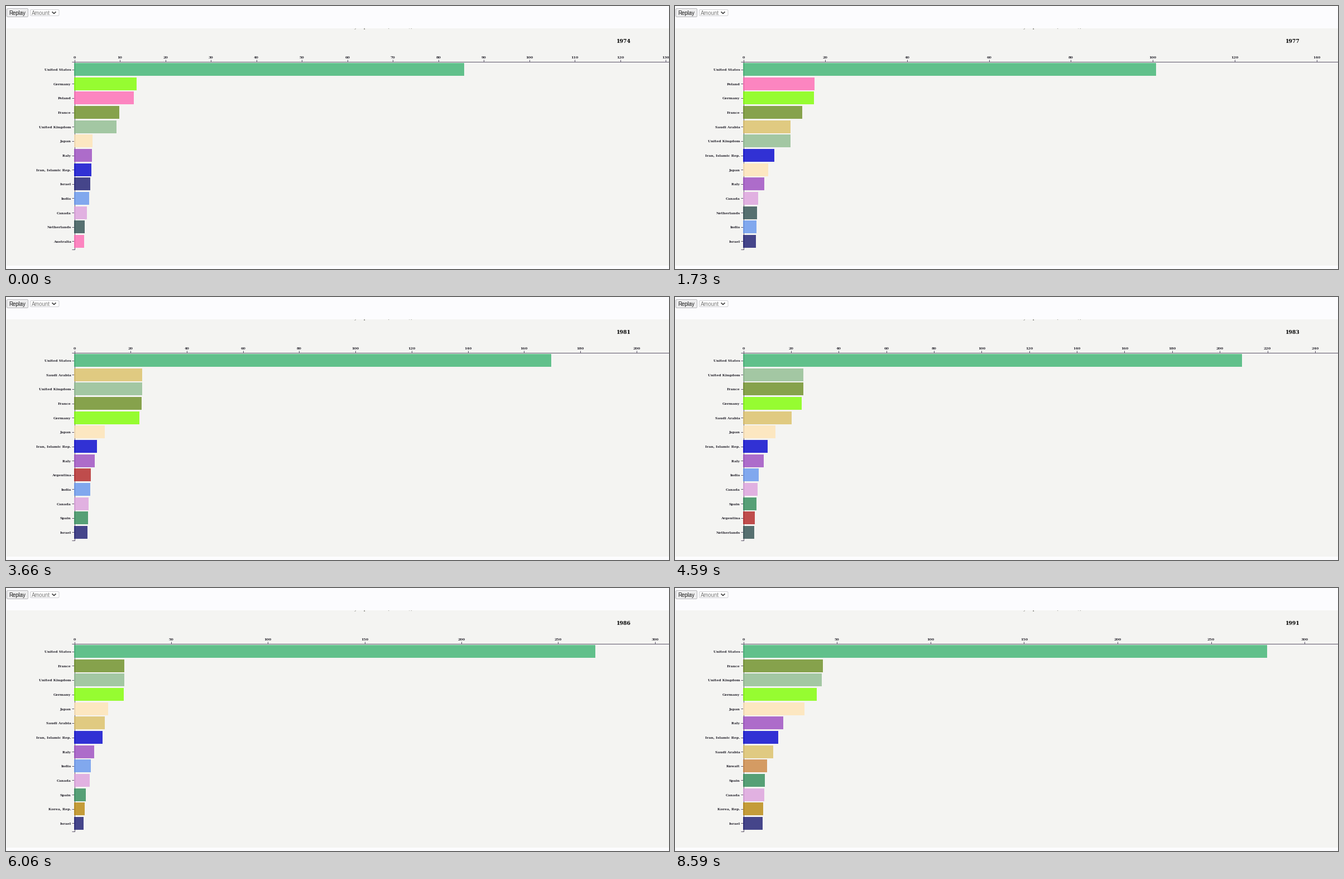
Recreate the animation shown at these times as a matplotlib script. Size 1188 by 471 pixels, loop 8880 ms.

```python
import math

import matplotlib.pyplot as plt
import numpy as np
from matplotlib.animation import FuncAnimation
from matplotlib.patches import FancyBboxPatch, Rectangle

W, H, DPI = 1188, 471, 64
LOOP, STEP = 8880, 30
FIRST_YEAR, FIRST_TICK, YEAR_MS = 1974, 418, 502

# Chart geometry in pixels
X0, SPAN, HEADROOM = 122, 1107, 50
TOP, BOTTOM, ROWS = 99.5, 435.5, 13
PITCH = (BOTTOM - TOP) / (ROWS + 0.1)

# Colour, whether the strong-dollar cycle applies, and a few turning points
SERIES = {
    "United States": ("#3cb371", False, {74: 85.8, 76: 89.4, 77: 100.9, 79: 122.2, 81: 169.8,
                                         85: 258.1, 88: 293, 90: 306, 91: 280.2}),
    "Germany": ("#7fff00", True, {74: 13.7, 81: 23.1, 88: 35.7, 91: 39.5}),
    "Poland": ("#ff69b4", False, {74: 13.1, 77: 17.4, 79: 0.1}),
    "France": ("#6b8e23", True, {74: 9.9, 81: 23.8, 91: 42.6}),
    "United Kingdom": ("#8fbc8f", True, {74: 9.3, 77: 11.5, 81: 24.1, 91: 42}),
    "Japan": ("#ffe4b5", True, {74: 4, 81: 10.9, 88: 28.2, 91: 32.8}),
    "Italy": ("#9c4ac0", True, {74: 3.9, 81: 7.35, 91: 21.5}),
    "Iran, Islamic Rep.": ("#0000cd", False, {74: 3.85, 77: 7.6, 79: 4.95, 81: 8.05, 88: 18.8}),
    "Israel": ("#191970", False, {74: 3.5, 77: 3.2, 81: 4.7, 85: 4.1, 91: 10.5}),
    "India": ("#6495ed", False, {77: 3.3, 81: 5.8, 85: 7.5, 88: 11.2, 91: 8.6}),
    "Canada": ("#dda0dd", False, {74: 2.8, 81: 5.1, 85: 7.4, 91: 11.35}),
    "Netherlands": ("#2f4f4f", True, {74: 2.3, 79: 4.3, 81: 4.6, 91: 7.4}),
    "Australia": ("#ff69b4", False, {74: 2.15, 81: 3.5, 91: 6}),
    "Saudi Arabia": ("#dcc065", False, {74: 2, 77: 11.6, 81: 24.3, 88: 13.3, 91: 16.25}),
    "Argentina": ("#b22222", True, {74: 1.5, 79: 4.35, 81: 5.86, 91: 3}),
    "Spain": ("#2e8b57", True, {74: 1.9, 79: 4.2, 81: 4.95, 91: 11.6}),
    "Korea, Rep.": ("#b8860b", False, {74: 0.6, 85: 4.8, 91: 10.8}),
    "Kuwait": ("#cd853f", False, {74: 0.2, 88: 1.5, 91: 12.8}),
}

INK = "#2c2a33"
AXIS = "#5b5368"
PAPER = "#f4f4f2"

fig = plt.figure(figsize=(W / DPI, H / DPI), dpi=DPI, facecolor="#fcfcfe")
ax = fig.add_axes([0, 0, 1, 1])
ax.set(xlim=(0, W), ylim=(H, 0))
ax.axis("off")


def rect(x, y, w, h, color, **kw):
    return ax.add_patch(Rectangle((x, y), w, h, fc=color, lw=0, **kw))


def line(x, y, color=AXIS, width=1):
    return ax.plot(x, y, color=color, lw=width * 72 / DPI,
                   solid_capstyle="butt")[0]


def text(x, y, s, px, color=INK, font="DejaVu Serif", weight="bold", **kw):
    return ax.text(x, y, s, fontsize=px * 72 / DPI, color=color, family=font,
                   weight=weight, va="baseline", **kw)


def box(x, y, w, h, fill, edge):
    ax.add_patch(FancyBboxPatch((x, y), w, h, fc=fill, ec=edge, lw=72 / DPI,
                                boxstyle="round,pad=0,rounding_size=2"))


def nice_step(span, count=10):
    """Tick step of 1, 2 or 5 times a power of ten."""
    raw = span / count
    base = 10 ** math.floor(math.log10(raw))
    for factor in (10, 5, 2):
        if raw / base >= math.sqrt(factor * {10: 5, 5: 2, 2: 1}[factor]):
            return base * factor
    return base


def value(name, year):
    """Steady growth between turning points, times the dollar cycle."""
    _, cyclic, points = SERIES[name]
    y = year - 1900
    v = math.exp(np.interp(y, list(points), np.log(list(points.values()))))
    if cyclic:
        v *= (1 + 0.17 * math.exp(-((y - 79) / 1.1) ** 2)
              - 0.27 * math.exp(-((y - 85) / 1.6) ** 2))
    return v


# Page controls and chart background
rect(1, 40, W - 1, 425, PAPER)
box(1.5, 4.5, 38, 15, "#ededee", "#b9b9bc")
text(20.5, 16, "Replay", 9.6, "#1c1c1c", "Liberation Sans", "normal", ha="center")
box(43.5, 6.5, 51.5, 11, "#ffffff", "#cfcfd2")
text(46, 16, "Amount", 9.6, "#7b7b7b", "Liberation Sans", "normal")
line([82.5, 86, 89.5], [10.3, 13.6, 10.3], "#4a4a4a", 1.8)

# Heading, cut off by the top edge of the chart
title = text(662.5, 40.4, "Military Expenditure (Billions $)", 7.2, "#77776f",
             ha="center", clip_on=True)
title.set_clip_path(Rectangle((580, 40), 170, 2, transform=ax.transData))

# Axes and one bar and label per row, under the bars
names = []
for r in range(ROWS):
    mid = TOP + PITCH * (r + 0.55)
    names.append(text(116.5, mid + 2.5, "", 6.3, ha="right"))
    line([118, X0], [mid, mid])
line([118, X0 + 0.5, X0 + 0.5, 118], [TOP, TOP, BOTTOM, BOTTOM])
line([X0, W], [TOP, TOP])
bars = [rect(X0, TOP + PITCH * (r + 0.1), 0, PITCH * 0.9, "w", alpha=0.8, zorder=3)
        for r in range(ROWS)]
ticks = [(line([0, 0], [95.5, TOP]), text(0, 94.3, "", 6.4, ha="center"))
         for _ in range(18)]
year_text = text(1106.5, 66.5, "", 9.2, "#000000", ha="center")


def draw(i):
    t = i * STEP + 20
    year = FIRST_YEAR + max(0, (t - FIRST_TICK) // YEAR_MS + 1)
    data = {name: value(name, year) for name in SERIES}
    ranked = sorted(data, key=data.get, reverse=True)[:ROWS]
    domain = data[ranked[0]] + HEADROOM
    scale = SPAN / domain

    year_text.set_text(str(year))
    for bar, label, name in zip(bars, names, ranked):
        bar.set_width(data[name] * scale)
        bar.set_facecolor(SERIES[name][0])
        label.set_text(name)

    step = nice_step(domain)
    for j, (mark, label) in enumerate(ticks):
        x = X0 + 0.5 + j * step * scale
        shown = x < W + 8
        mark.set_visible(shown)
        label.set_visible(shown)
        mark.set_xdata([x, x])
        label.set_x(x)
        label.set_text(f"{j * step:g}")
    return []


anim = FuncAnimation(fig, draw, frames=LOOP // STEP, interval=STEP,
                     repeat=True, repeat_delay=0, blit=False)
plt.show()
```
